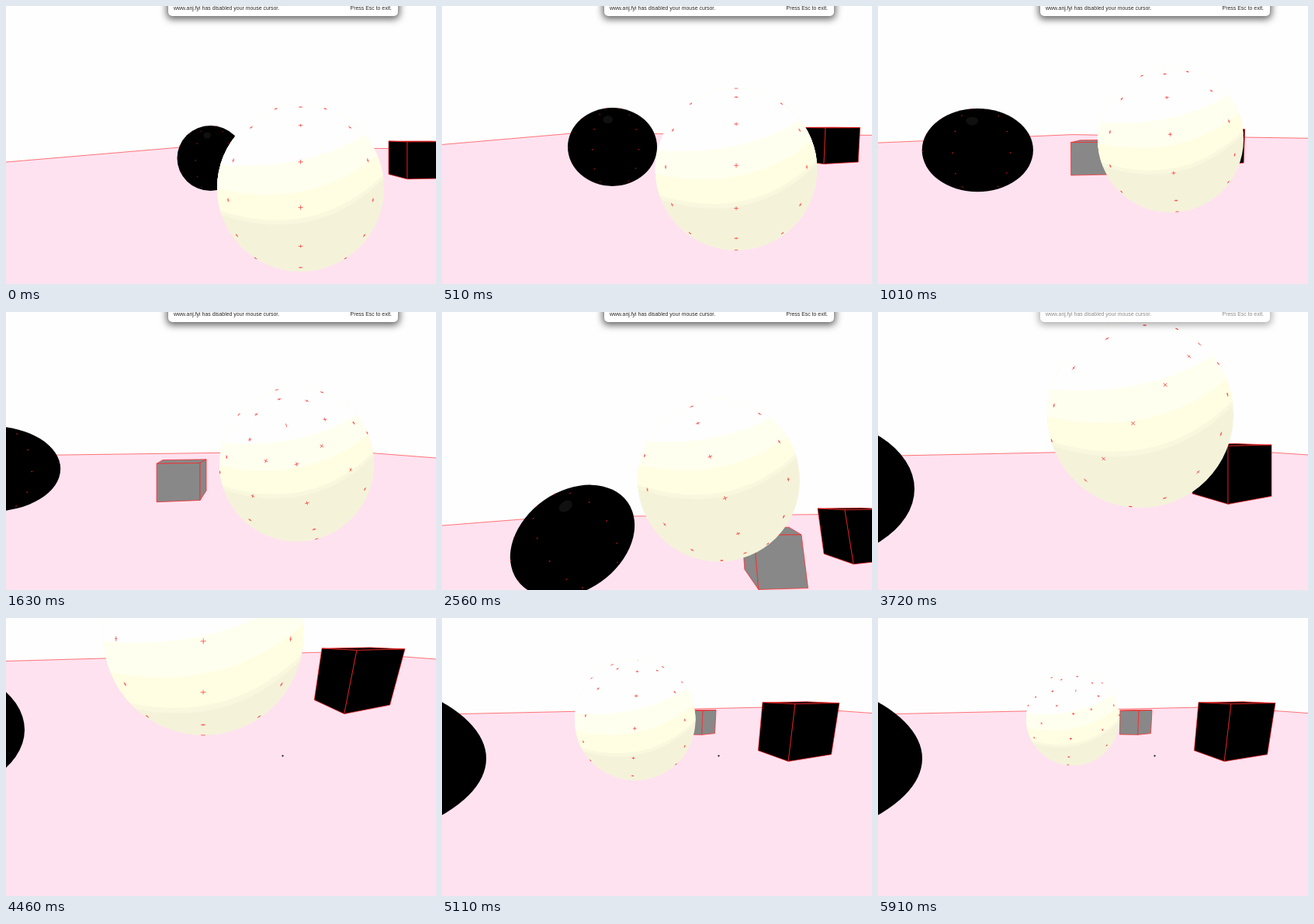
Recreate the animation shown at these times as an HTML page with a canvas. Size 554 px wide and 358 px high, loop 6.01 s.

```html
<!DOCTYPE html>
<html lang="en">
<head>
<meta charset="utf-8">
<title>Rolling ball</title>
<style>
  html, body { margin: 0; width: 554px; height: 358px; overflow: hidden; background: #fefefe; }
  canvas { display: block; }
  #notice {
    position: absolute; left: 208.5px; top: -20px; width: 296px; height: 32.5px;
    box-sizing: border-box; padding: 19px 7.5px 0; border-radius: 5px;
    display: flex; justify-content: space-between;
    background: #fff; color: #222; white-space: nowrap;
    font: 6.93px/8px "Liberation Sans", Arial, sans-serif;
    box-shadow: 0 0 1px rgba(0,0,0,.4), 0 2px 10px 2px rgba(0,0,0,.6);
  }
</style>
</head>
<body>
<canvas id="stage" width="554" height="358"></canvas>
<div id="notice"><span>www.anj.fyi has disabled your mouse cursor.</span><span>Press Esc to exit.</span></div>
<script>
const WIDTH = 554, HEIGHT = 358, LOOP = 6010, RED = '#ff2020';
const ctx = document.getElementById('stage').getContext('2d');
const notice = document.getElementById('notice');

const clamp = v => Math.max(0, Math.min(1, v));
const rad = deg => deg * Math.PI / 180;

// Refresh rhythm: from a start time on, one picture every so many ms
const RHYTHM = [[0, 90], [90, 150], [660, 117.5], [1280, 116.3], [2560, 150],
  [3570, 148], [4730, 150], [4880, 98], [5460, 90]];

// Camera moves between stops: start, end, ease-out power
const MOVES = [[0, 510, 1], [510, 1630, 1], [1630, 2560, 1], [2710, 3310, 2], [4020, 4460, 2], [4460, 4800, 2]];

// Key poses; the first column is the camera stop or the time
// stop, left y, corner x, corner y, right y, lean of uprights
const FLOOR = [
  [0, 201, 230, 181.5, 184, 0], [1, 171.5, 150, 158.5, 161, -.02], [2, 185, 440, 179.2, 188, 0],
  [3, 275, 140, 264, 260, .05], [4, 185.5, 440, 176.5, 184, 0], [5, 55.5, 430, 43.5, 53, -.085],
  [6, 124, 440, 114.5, 122.5, -.05]];

// stop, x of near upright, its height, left x, right x
const BLACK_CUBE = [
  [0, 517, 48, 493, 570], [1, 487, 46, 450, 529], [2, 340, 46, 300, 365], [3, 519, 70, 484, 575],
  [4, 451, 75, 405, 507], [5, 452, 82, 407, 514], [6, 455, 74, 413, 512]];
const GREY_CUBE = [[0, 385, 29, 360, 405], [2, 250, 48, 194, 258], [3, 402, 70, 386, 463],
  [4, 350, 39, 310, 375], [6, 336, 31, 312, 353]];

// stop, x, y, rx, ry, tilt
const BLACK_SPHERE = [
  [0, 263.5, 196, 43, 42, 0], [1, 206, 177, 62, 53, 0], [2, -20, 202, 90, 55, 0], [3, 168, 295, 87, 64, -35],
  [4, -103, 228, 150, 95, 0], [5, -126, 144, 150, 90, 0], [6, -243, 181, 300, 124, 0]];

// time, x, y below the floor corner, radius
const BALL = [
  [0, 379.5, 53, 107.5], [240, 381, 64, 121], [510, 377.5, 32.5, 91], [900, 377, 6, 94],
  [1630, 374.5, 17, 99.5], [2560, 356.5, -47, 104.5], [3160, 347, 0, 109], [3720, 338, -44.5, 120],
  [4460, 254, -21.5, 129], [4730, 245, 16, 89], [5470, 253, 18, 65], [5910, 251, 15.5, 60]];

// time, pitch, roll
const SPIN = [[0, 9.5, 0], [510, -5.5, 0], [1630, 67.5, -15], [2560, 167, -20],
  [3720, 185, 40], [4460, 182.5, 0], [5910, 243, 6]];

function sample(table, key) {
  const next = table.findIndex(row => row[0] > key);
  if (next < 0) return table[table.length - 1].slice(1);
  const a = table[next - 1], b = table[next], k = (key - a[0]) / (b[0] - a[0]);
  return a.map((v, i) => v + (b[i] - v) * k).slice(1);
}

const cameraStop = t => MOVES.reduce(
  (sum, [from, to, power]) => sum + 1 - (1 - clamp((t - from) / (to - from))) ** power, 0);

function trace(points, close) {
  ctx.beginPath();
  points.forEach(([x, y]) => ctx.lineTo(x, y));
  if (close) ctx.closePath();
}

function oval(x, y, rx, ry, tilt, color) {
  ctx.beginPath();
  ctx.ellipse(x, y, rx, ry, tilt, 0, 2 * Math.PI);
  ctx.fillStyle = color;
  ctx.fill();
}

function drawFloor([left, x, y, right]) {
  const edge = [[0, left], [x, y], [WIDTH, right]];
  trace([...edge, [WIDTH, HEIGHT], [0, HEIGHT]], true);
  ctx.fillStyle = '#ffe2f0';
  ctx.fill();
  trace(edge);
  ctx.lineWidth = .6;
  ctx.stroke();
}

// Farther uprights shrink towards the horizon; the wider face recedes less
function drawCube([x, height, left, right], [floorLeft, cornerX, cornerY, floorRight, lean], drop, color) {
  const horizon = -16 + (x < cornerX
    ? floorLeft + (cornerY - floorLeft) * x / cornerX
    : cornerY + (floorRight - cornerY) * (x - cornerX) / (WIDTH - cornerX));
  const depth = height / 190, share = (x - left) / (right - left);
  const leftScale = 1.06 - depth * (1 - share), rightScale = 1.06 - depth * share;
  const upright = (px, scale) => [
    [px, horizon + drop * height * scale],
    [px + lean * (px - WIDTH / 2) * height * scale / 75, horizon + (drop + 1) * height * scale]];
  const near = upright(x, 1), l = upright(left, leftScale), r = upright(right, rightScale);
  const back = upright(left + right - x, leftScale * rightScale);
  ctx.lineWidth = .7;
  ctx.fillStyle = color;
  [[l[0], back[0], r[0], near[0]], [l[0], near[0], near[1], l[1]], [near[0], r[0], r[1], near[1]]].forEach(face => {
    trace(face, true);
    ctx.fill();
    ctx.stroke();
  });
}

// Short ticks where a coarse wire mesh touches the surface, centred on the current origin
function drawMesh(rx, ry, pitch, yaw, size) {
  const DISTANCE = 3, zoom = Math.sqrt(DISTANCE ** 2 - 1);
  const project = (lat, lon) => {
    const x = Math.cos(lat) * Math.sin(lon + yaw), y = -Math.sin(lat), z = Math.cos(lat) * Math.cos(lon + yaw);
    const depth = z * Math.cos(pitch) - y * Math.sin(pitch), k = zoom / (DISTANCE - depth);
    return [rx * k * x, ry * k * (y * Math.cos(pitch) + z * Math.sin(pitch)), depth];
  };
  ctx.beginPath();
  for (let i = -4; i <= 4; i++) {
    const pole = Math.abs(i) === 4, lat = rad(i * 22.5);
    for (let j = 0; j < (pole ? 1 : 8); j++) {
      const lon = rad(j * 45), turn = pole ? 0 : size / Math.cos(lat);
      if (project(lat, lon)[2] < 1 / DISTANCE) continue;
      [[size, 0], [0, turn]].forEach(([a, b]) => {
        ctx.moveTo(...project(lat - a, lon - b));
        ctx.lineTo(...project(lat + a, lon + b));
      });
    }
  }
  ctx.lineWidth = .65;
  ctx.stroke();
}

function drawSphere([x, y, rx, ry, tilt]) {
  ctx.save();
  ctx.translate(x, y);
  oval(0, 0, rx, ry, rad(tilt), '#000');
  oval(-rx * .1, -ry * .7, rx * .11, ry * .1, rad(tilt), '#101010');
  ctx.rotate(rad(tilt));
  drawMesh(rx, ry, rad(3), rad(26), .01);
  ctx.restore();
}

// Toon shading: evenly spaced light edges that slide as the camera tilts
function drawBall([x, dy, r], [pitch, roll], cornerY) {
  const slide = (165 - cornerY) * .0025;
  ctx.save();
  ctx.translate(x, cornerY + dy);
  ctx.save();
  oval(0, 0, r, r, 0, '#f4f3da');
  ctx.clip();
  ctx.scale(r, r);
  [[1, '#f9f8de'], [.85, '#fffee3'], [0, '#fffff0'], [-1, '#fefefe']].forEach(([level, color]) => {
    ctx.beginPath();
    ctx.moveTo(-1.05, slide + .04 + .29 * level);
    ctx.quadraticCurveTo(.2, slide + .33 + .45 * level, 1.05, slide - .46 + .33 * level);
    ctx.lineTo(1.3, -1.5);
    ctx.lineTo(-1.3, -1.5);
    ctx.fillStyle = color;
    ctx.fill();
  });
  ctx.restore();
  ctx.rotate(rad(roll));
  drawMesh(r, r, rad(pitch), 0, .02);
  ctx.restore();
}

function draw(t) {
  const stop = cameraStop(t), floor = sample(FLOOR, stop);
  ctx.fillStyle = '#fefefe';
  ctx.fillRect(0, 0, WIDTH, HEIGHT);
  ctx.strokeStyle = RED;
  drawFloor(floor);
  drawCube(sample(GREY_CUBE, stop), floor, .6, '#888');
  drawCube(sample(BLACK_CUBE, stop), floor, .15, '#000');
  drawSphere(sample(BLACK_SPHERE, stop));
  drawBall(sample(BALL, t), sample(SPIN, t), floor[2]);
  if (t >= 4160) oval(356.5, 177.5, 1.1, 1.1, 0, '#000');
  notice.style.opacity = clamp((4160 - t) / 850);
}

const start = performance.now();
function frame() {
  const now = (performance.now() - start) % LOOP;
  const [from, step] = RHYTHM.filter(([time]) => time <= now).pop();
  draw(from + Math.floor((now - from) / step) * step);
  requestAnimationFrame(frame);
}
frame();
</script>
</body>
</html>
```
